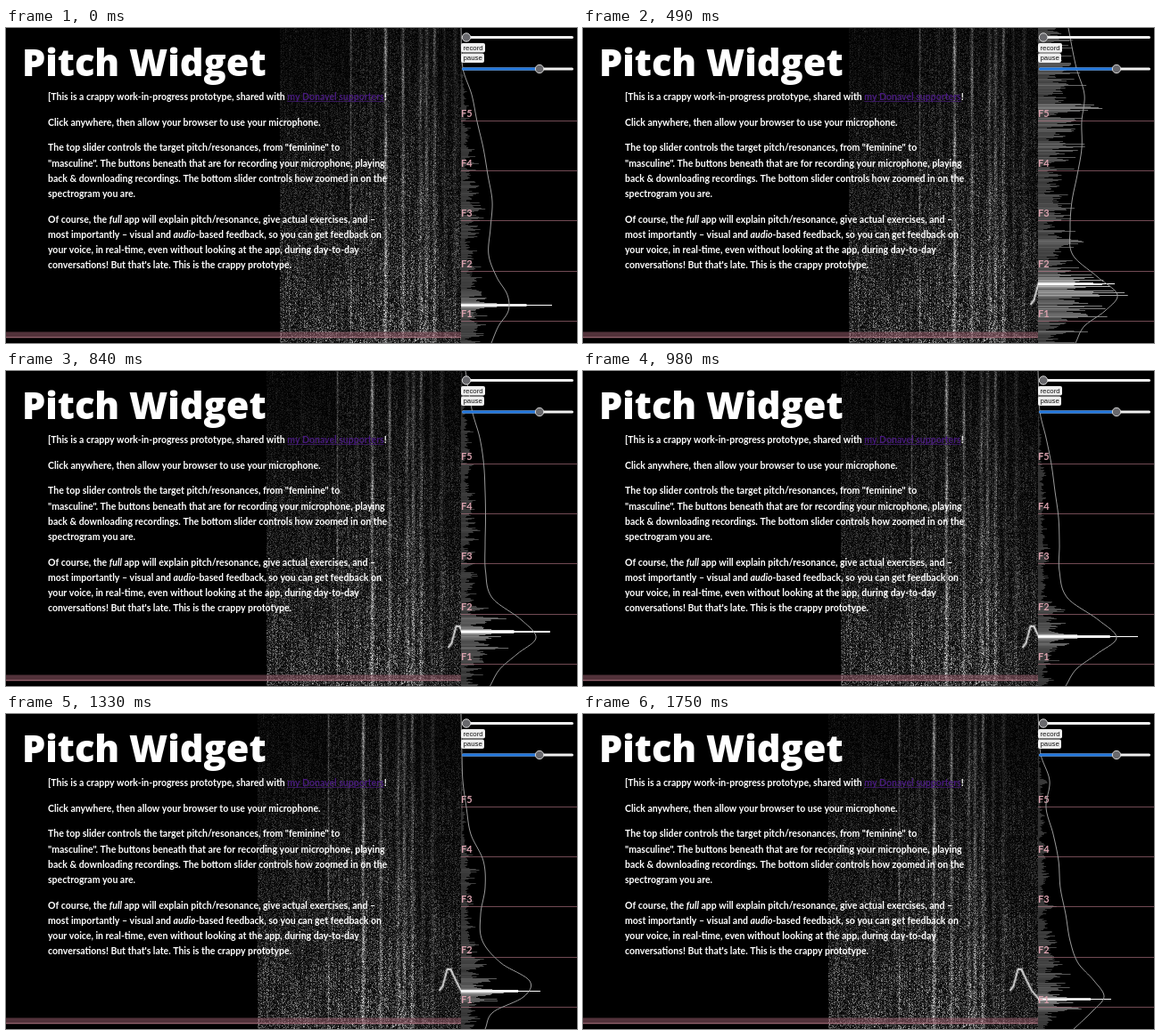
These frames come from a looping animation (640x354 px, 1820 ms). An HTML page with a canvas:

```html
<!DOCTYPE html>
<html lang="en">
<head>
<meta charset="utf-8">
<title>Pitch Widget</title>
<style>
  html, body { margin: 0; width: 100%; height: 100%; overflow: hidden; background: #000; }
  canvas { display: block; width: 640px; height: 354px; }
</style>
</head>
<body>
<canvas id="stage" width="640" height="354"></canvas>
<script>
const W = 640, H = 354, STEP = 70, STEPS = 26;
const LEFT = 307, PANEL = 510, SPEED = 1.29;
const ctx = document.getElementById('stage').getContext('2d');

function seeded(seed) {
  let a = seed >>> 0;
  return () => {
    a = (a + 0x6D2B79F5) >>> 0;
    let t = Math.imul(a ^ (a >>> 15), a | 1);
    t ^= t + Math.imul(t ^ (t >>> 7), t | 61);
    return ((t ^ (t >>> 14)) >>> 0) / 4294967296;
  };
}

// Spectrum poses: resonance peak, its length, noise level, envelope widths
const ROWS = [0, 45, 75, 105, 135, 165, 195, 225, 255, 280, 300, 318, 335, 354];
const POSES = [
  { at: 0, peak: 311, len: 102, noise: .6, env: [0, 2, 12, 18, 25, 30, 35, 33, 31, 40, 52, 53, 42, 34] },
  { at: 3, peak: 306, len: 117, noise: .45, env: [0, 1, 7, 11, 18, 26, 29, 30, 37, 51, 78, 75, 46, 30] },
  { at: 7, peak: 287, len: 86, noise: 1, env: [34, 43, 52, 49, 49, 44, 38, 36, 39, 67, 89, 75, 52, 42] },
  { at: 10, peak: 287, len: 110, noise: .75, env: [10, 23, 33, 36, 35, 32, 30, 31, 37, 68, 80, 60, 44, 34] },
  { at: 14, peak: 298, len: 112, noise: .45, env: [0, 2, 9, 15, 19, 23, 24, 24, 33, 68, 88, 66, 43, 31] },
  { at: 19, peak: 311, len: 89, noise: .6, env: [0, 1, 2, 6, 11, 25, 27, 22, 24, 45, 77, 70, 36, 27] },
  { at: 25, peak: 320, len: 82, noise: .55, env: [0, 3, 13, 9, 17, 23, 25, 31, 36, 45, 63, 74, 60, 40] }
];

const mix = (a, b, k) => a + (b - a) * k;

function poseAt(step) {
  let i = 0;
  while (i < POSES.length - 2 && POSES[i + 1].at <= step) i++;
  const a = POSES[i], b = POSES[i + 1];
  const k = Math.min(1, (step - a.at) / (b.at - a.at));
  return {
    peak: mix(a.peak, b.peak, k),
    len: mix(a.len, b.len, k),
    noise: mix(a.noise, b.noise, k),
    env: a.env.map((v, n) => mix(v, b.env[n], k))
  };
}

// Smooth curve through all envelope points
function envelope(env, y) {
  let i = 0;
  const last = ROWS.length - 1;
  while (i < last - 1 && ROWS[i + 1] <= y) i++;
  const slope = n => {
    const a = Math.max(0, n - 1), b = Math.min(last, n + 1);
    return (env[b] - env[a]) / (ROWS[b] - ROWS[a]);
  };
  const h = ROWS[i + 1] - ROWS[i], t = (y - ROWS[i]) / h, s = 1 - t;
  return Math.max(0, s * s * (1 + 2 * t) * env[i] + t * t * (1 + 2 * s) * env[i + 1]
    + h * t * s * (s * slope(i) - t * slope(i + 1)));
}

// Column position, half width, brightness
const STREAKS = [
  [346, 1, 12], [386, 1, 60], [408, 1.5, 14], [425, 1.6, 120], [444.5, 1.5, 85],
  [464, 2, 50], [471, 2, 60], [480, 1.6, 60], [491, 1.5, 32], [503, 2, 28]
];

function makeCanvas(width) {
  const c = document.createElement('canvas');
  c.width = width;
  c.height = H;
  return c;
}

function makeSpectrogram() {
  const raw = makeCanvas(238), out = makeCanvas(238);
  const img = new ImageData(raw.width, H);
  const rnd = seeded(41);
  for (let i = 0; i < raw.width; i++) {
    const u = LEFT + i;
    const gain = (.85 + rnd() * .3) * (u > 484 ? .7 : 1);
    const streak = STREAKS.reduce((sum, [x, w, v]) => sum + v * Math.exp(-(((u - x) / w) ** 2)), 0);
    const phase = rnd() * 6;
    for (let y = 0; y < H; y++) {
      const slow = .85 + .25 * Math.sin(y / 23 + phase);
      const depth = 10 + 46 * (y / H) ** 1.2 + (u > 385 ? 7 : 0);
      const grain = rnd();
      const v = depth * gain * slow * (.15 + 2.6 * grain * grain)
        + streak * (.65 + .5 * grain) * (.8 + .2 * Math.sin(y / 17 + u / 4));
      const p = (y * raw.width + i) * 4;
      img.data[p] = img.data[p + 1] = img.data[p + 2] = Math.min(225, v);
      img.data[p + 3] = 255;
    }
  }
  raw.getContext('2d').putImageData(img, 0, 0);

  const g = out.getContext('2d');
  g.drawImage(raw, 0, 0);
  g.filter = 'blur(0.7px)';
  g.drawImage(raw, 0, 0);

  g.beginPath();
  for (let s = 0; s < STEPS; s += .5) g.lineTo(510.5 - LEFT + s * SPEED, poseAt(s).peak);
  g.lineJoin = 'round';
  g.strokeStyle = 'rgba(255,255,255,.2)';
  g.lineWidth = 4;
  g.stroke();
  g.strokeStyle = 'rgba(255,255,255,.7)';
  g.lineWidth = 1.8;
  g.stroke();
  return out;
}

const spectrogram = makeSpectrogram();

function drawSpectrogram(step) {
  const x = LEFT - Math.round(step * SPEED), w = PANEL - x;
  ctx.drawImage(spectrogram, 0, 0, w, H, x, 0, w, H);
  ctx.fillStyle = 'rgba(150,92,106,.55)';
  ctx.fillRect(0, 341.5, PANEL, 7);
  ctx.fillStyle = 'rgba(215,150,164,.5)';
  ctx.fillRect(0, 347, PANEL, 1);
}

function drawSpectrum(step) {
  const pose = poseAt(step), rnd = seeded(900 + step * 37);
  ctx.fillStyle = '#000';
  ctx.fillRect(PANEL, 0, W - PANEL, H);

  let level = rnd();
  for (let y = 0; y < H; y++) {
    level = mix(level, rnd() < .12 ? 1.5 : rnd() * .9, .5);
    const hiss = envelope(pose.env, y) * pose.noise * level;
    const d = Math.abs(y - pose.peak);
    const tone = pose.len * (.55 * Math.exp(-((d / 1.5) ** 2)) + .45 * Math.exp(-d / 5));
    const len = Math.max(hiss, tone);
    const v = Math.min(255, 45 + hiss * 1.1 + tone * 2.2);
    ctx.fillStyle = `rgb(${v},${v},${v})`;
    ctx.fillRect(PANEL, y, len, 1);
  }

  ctx.font = 'bold 11px Lato, sans-serif';
  for (let n = 1; n <= 5; n++) {
    const y = Math.round(385 - n * 56.2);
    ctx.fillStyle = 'rgba(190,125,140,.6)';
    ctx.fillRect(PANEL, y, W - PANEL, 1);
    ctx.fillStyle = '#d9a2ae';
    ctx.fillText('F' + n, PANEL, y - 4);
  }

  ctx.beginPath();
  for (let y = 0; y <= H; y += 2) ctx.lineTo(PANEL + envelope(pose.env, y), y);
  ctx.strokeStyle = '#9a9a9a';
  ctx.lineWidth = 1;
  ctx.stroke();
}

function pill(x, y, w, h, r, fill) {
  ctx.beginPath();
  ctx.roundRect(x, y, w, h, r);
  ctx.fillStyle = fill;
  ctx.fill();
}

function slider(y, value) {
  pill(511, y - 1.5, 125, 3, 1.5, '#efefef');
  if (value > 516) pill(511, y - 1.5, value - 511, 3, 1.5, '#1f75dc');
  ctx.beginPath();
  ctx.arc(value, y, 4.7, 0, Math.PI * 2);
  ctx.fillStyle = '#68686c';
  ctx.fill();
  ctx.strokeStyle = '#d8d8d8';
  ctx.lineWidth = 1;
  ctx.stroke();
}

function button(y, w, label) {
  pill(510, y, w, 10.5, 2, '#efefef');
  ctx.fillStyle = '#111';
  ctx.font = '7.8px "Liberation Sans", sans-serif';
  ctx.fillText(label, 512.5, y + 7.7);
}

function drawControls() {
  slider(10.5, 516);
  button(17, 27, 'record');
  button(28.5, 26, 'pause');
  slider(46, 598);
}

// *...* marks italics, {...} marks the link
const LINES = [
  [81, '[This is a crappy work-in-progress prototype, shared with {my Donavel supporters}!'],
  [109.5, 'Click anywhere, then allow your browser to use your microphone.'],
  [138, 'The top slider controls the target pitch/resonances, from "feminine" to'],
  [155.5, '"masculine". The buttons beneath that are for recording your microphone, playing'],
  [172.5, 'back & downloading recordings. The bottom slider controls how zoomed in on the'],
  [190, 'spectrogram you are.'],
  [218.5, 'Of course, the *full* app will explain pitch/resonance, give actual exercises, and –'],
  [235.5, 'most importantly – visual and *audio*-based feedback, so you can get feedback on'],
  [253, 'your voice, in real-time, even without looking at the app, during day-to-day'],
  [270, 'conversations! But that\'s late. This is the crappy prototype.']
];

function drawText() {
  ctx.fillStyle = '#fff';
  ctx.font = '800 41.6px "Open Sans", sans-serif';
  ctx.fillText('Pitch Widget', 18, 54);
  for (const [y, line] of LINES) {
    let x = 47;
    for (const run of line.split(/(\*[^*]+\*|\{[^}]+\})/)) {
      const italic = run[0] === '*', link = run[0] === '{';
      const text = italic || link ? run.slice(1, -1) : run;
      ctx.font = (italic ? 'italic ' : '') + 'bold 10.5px Lato, sans-serif';
      ctx.fillStyle = link ? '#471a7c' : '#fff';
      ctx.fillText(text, x, y);
      const w = ctx.measureText(text).width;
      if (link) ctx.fillRect(x, y + 1, w, .7);
      x += w;
    }
  }
}

const start = performance.now();

function frame() {
  const step = Math.floor((performance.now() - start) / STEP) % STEPS;
  ctx.fillStyle = '#000';
  ctx.fillRect(0, 0, W, H);
  drawSpectrogram(step);
  drawSpectrum(step);
  drawControls();
  drawText();
  requestAnimationFrame(frame);
}
frame();
</script>
</body>
</html>
```
